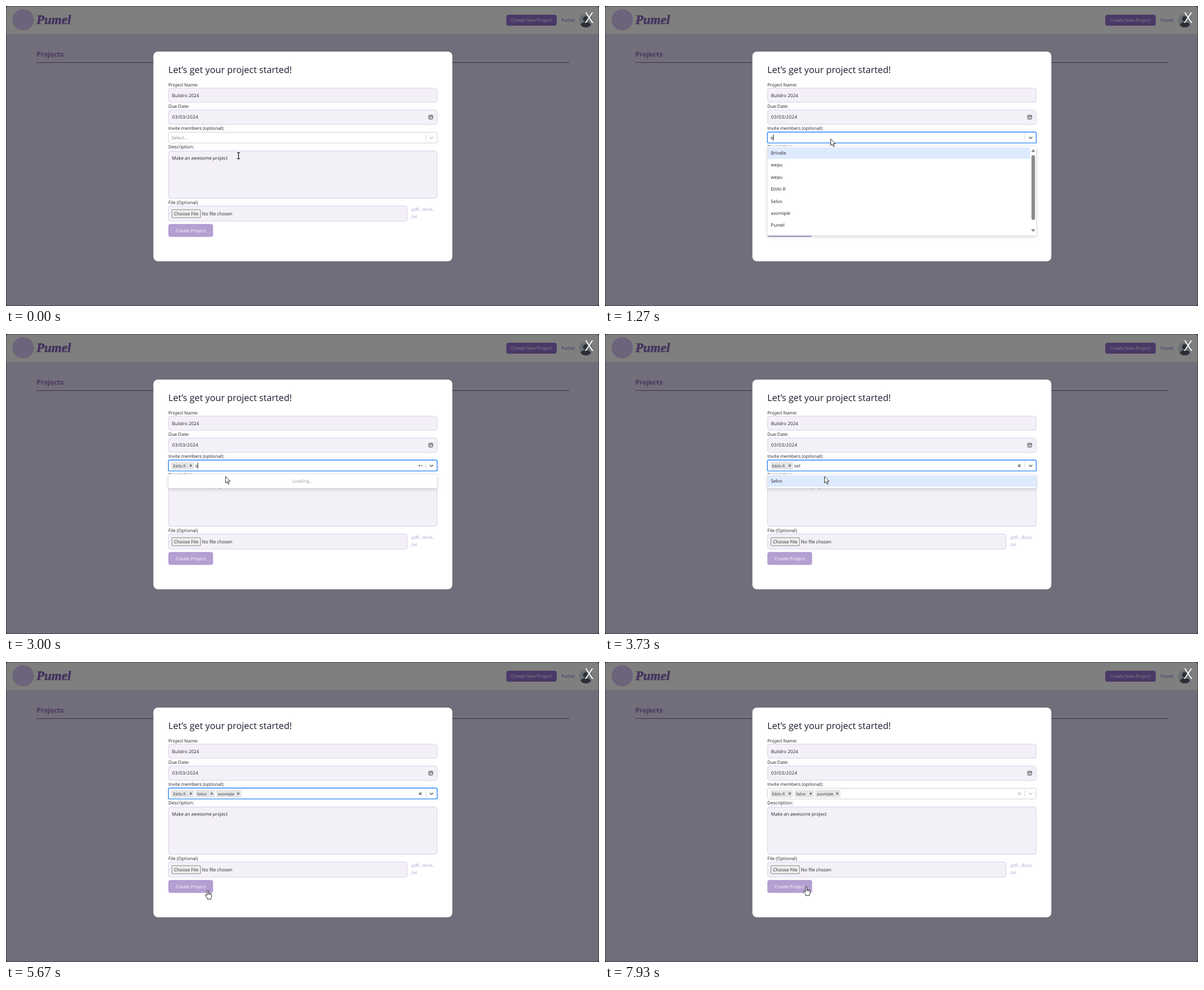
Recreate the animation shown at these times as an HTML page. Size 1052 by 533 pixels, loop 8000 ms.

```html
<!DOCTYPE html>
<html lang="en">
<head>
<meta charset="utf-8">
<title>New project form</title>
<style>
  html, body { margin: 0; width: 100%; height: 100%; overflow: hidden; background: #716d7a; }
  svg { display: block; width: 1052px; height: 533px; }
  text { font: 8.1px "Open Sans", "Noto Sans", sans-serif; fill: #212129; text-rendering: geometricPrecision; white-space: pre; }
  .title { font-size: 16.2px; fill: #1c1b2e; }
  .brand { font: italic bold 23px "Liberation Serif", serif; fill: #46345f; stroke: #46345f; stroke-width: .7; }
  .heading { font-size: 12px; font-weight: bold; fill: #49365f; }
  .close { font-size: 26px; fill: #fff; }
  .dim { fill: #86828b; }
  .nav { fill: #46345f; }
  .hint { fill: #b09acd; }
  .light { fill: #fff; }
  .grey { fill: #858585; }
  .mid { fill: #999; text-anchor: middle; }
  .date { letter-spacing: .35px; }
  .chip { font-size: 6.9px; fill: #333; }
  .field { fill: #f4f0f8; stroke: #d9cfe9; }
  .menu { fill: #fff; stroke: #000; stroke-opacity: .1; stroke-width: .6; filter: drop-shadow(0 2px 3px rgba(0, 0, 0, .16)); }
</style>
</head>
<body>
<svg viewBox="0 0 1052 533">
  <defs><clipPath id="listClip"><rect x="288" y="249" width="478" height="159"/></clipPath></defs>
  <rect width="1052" height="533" fill="#38373b"/>
  <rect x=".8" y=".8" width="1050.4" height="531.4" rx="4" fill="#716d7a"/>
  <path d="M.8 50V4.8a4 4 0 0 1 4-4H1047.2a4 4 0 0 1 4 4V50Z" fill="#7f7f7f"/>
  <circle cx="30.5" cy="24.5" r="19" fill="#6c647a"/>
  <text class="brand" x="54" y="32">Pumel</text>
  <rect x="887.5" y="15.5" width="89.5" height="19.5" rx="4" fill="#4a3866"/>
  <text class="dim" x="896" y="28.4">Create New Project</text>
  <text class="nav" x="985" y="28.4">Pumel</text>
  <circle cx="1028.5" cy="26" r="12" fill="#6a7075"/>
  <circle cx="1028.5" cy="23" r="4.8" fill="#2b3037"/>
  <path d="M1019.5 34Q1021 28.5 1028.5 28.5T1037.5 34A12 12 0 0 1 1019.5 34Z" fill="#2b3037"/>
  <text class="close" x="1027" y="30.3">X</text>
  <text class="heading" x="54" y="90.2">Projects</text>
  <path d="M54 100.5H999" stroke="#37323f"/>

  <rect x="261.5" y="81" width="530.3" height="372.5" rx="8" fill="#fff"/>
  <text class="title" x="288" y="118.8">Let’s get your project started!</text>
  <text x="288" y="142.5">Project Name:</text>
  <rect class="field" x="288.5" y="146" width="476.3" height="25" rx="3.5"/>
  <text x="294.5" y="161.6">Buildro 2024</text>
  <text x="288" y="181">Due Date:</text>
  <rect class="field" x="288.5" y="184.8" width="476.3" height="25.4" rx="3.5"/>
  <text class="date" x="294.7" y="200.4">03/03/2024</text>
  <g fill="none" stroke="#333">
    <rect x="750" y="194" width="7" height="7" rx="1.2" stroke-width=".9"/>
    <path d="M750 196H757" stroke-width="1"/>
    <path d="M751.4 198H756M751.4 199.6H754.5" stroke-width=".8" stroke-dasharray="1 .7"/>
  </g>
  <text x="288" y="220.4">Invite members (optional):</text>
  <text x="288" y="253.4">Description:</text>
  <rect class="field" x="288.5" y="257.6" width="476.3" height="84" rx="3.5"/>
  <text x="294.5" y="272.6">Make an awesome project</text>
  <text x="288" y="351.6">File (Optional)</text>
  <rect class="field" x="288.5" y="355.2" width="423" height="27" rx="3.5"/>
  <rect x="294.3" y="361.9" width="50.8" height="14.2" rx="1.2" fill="#efefef" stroke="#6b6b6b" stroke-width=".8"/>
  <text x="298" y="371.9">Choose File</text>
  <text x="347.8" y="371.9">No file chosen</text>
  <text class="hint" x="717.5" y="364.4">.pdf, .docx,</text>
  <text class="hint" x="717.5" y="377.2">.txt</text>
  <rect x="288" y="387.2" width="79.4" height="23" rx="4" fill="#b49fd2"/>
  <text class="light" x="301" y="401.6">Create Project</text>
  <g id="select"></g>
  <g id="cursor"></g>
</svg>
<script>
const LOOP = 8000, STEP = 200 / 3;
const FOCUS = 400, BLUR = 6070;
const people = ['Brindle', 'wepu', 'wepu', 'Ettilo R', 'Selvo', 'avomiple', 'Pumel', 'Terave'];
const chips = [
  { name: 'Ettilo R', x: 293.6, w: 39.8 },
  { name: 'Selvo', x: 336, w: 34.6 },
  { name: 'avomiple', x: 372.8, w: 44.8 }
];
const inputX = [293.7, 335.8, 373, 420];

// time, typed text, chips chosen, menu content, loading
const states = [
  [0, '', 0, ''],
  [400, '', 0, 'No options'],
  [800, '', 0, ''],
  [1270, 'e', 0, 'all'],
  [1400, 'et', 0, 'match', true],
  [1470, 'ett', 0, 'match', true],
  [1530, 'etti', 0, 'match', true],
  [1730, 'etti', 0, 'match'],
  [2600, '', 1, ''],
  [3000, 's', 1, 'Loading...', true],
  [3070, 'se', 1, 'Loading...', true],
  [3200, 'sel', 1, 'Loading...', true],
  [3400, 'sel', 1, 'match'],
  [3870, '', 2, ''],
  [4670, 'a', 2, 'Loading...', true],
  [4730, 'av', 2, 'Loading...', true],
  [4870, 'av', 2, 'match'],
  [5270, '', 3, '']
];
const loadStarts = [1400, 3000, 4670];
const caretOn = [[1270, 2070], [2600, 3730], [4270, 5270], [5800, 6070]];

// time, x, y of the pointer's hot spot
const path = [
  [0, 412.5, 266], [330, 400.5, 236], [2000, 400.5, 236], [2330, 389.5, 254.3],
  [2470, 389.5, 253], [5270, 389.5, 253], [5600, 357, 409], [5670, 358, 405.3],
  [6870, 358, 405.3], [7130, 357, 409.5], [7400, 357, 399], [7860, 357, 399], [7930, 356.7, 397.8]
];

const shapes = {
  arrow: '<path d="M0 0V11.7l2.6-2.5 2 4.6 1.9-.8-2-4.5h3.6Z" fill="#fff" stroke="#111" stroke-width=".85" stroke-linejoin="round"/>',
  beam: '<path d="M-2.6-5.4H-.8L0-4.9.8-5.4H2.6M0-5V5M-2.6 5.4H-.8L0 4.9.8 5.4H2.6" fill="none" stroke="#111" stroke-width="1.2"/>',
  hand: '<path d="M-1.3 9.5V1.2A1.2 1.2 0 0 1 1.1 1.2V5.5L5.6 6.4Q6.8 6.8 6.8 8.2V11Q6.8 12.5 5.8 14V16H-1V14.4L-4.3 9.6Q-4.8 8.4-3.8 8.1-2.8 8-1.3 9.5Z" fill="#fff" stroke="#111" stroke-width=".9" stroke-linejoin="round"/>' +
    '<path d="M1.1 5.5V8.5M3 6V8.5M4.9 6.3V8.5" stroke="#111" stroke-width=".7"/>',
  busy: '<circle cx="9.6" cy=".3" r="3.7" fill="#e6f2fd" stroke="#2f86e0" stroke-width="2.6"/>'
};

const selectEl = document.getElementById('select');
const cursorEl = document.getElementById('cursor');
const pen = document.createElement('canvas').getContext('2d');
pen.font = '8.1px "Open Sans", "Noto Sans", sans-serif';

const text = (x, y, s, cls = '') => `<text x="${x}" y="${y}" class="${cls}">${s}</text>`;
const rect = (x, y, w, h, attrs) => `<rect x="${x}" y="${y}" width="${w}" height="${h}" ${attrs}/>`;
const line = (d, color, width) => `<path d="${d}" fill="none" stroke="${color}" stroke-width="${width}"/>`;
const cross = (x, y, r, color, width) =>
  line(`M${x - r} ${y - r}L${x + r} ${y + r}M${x + r} ${y - r}L${x - r} ${y + r}`, color, width);

function stateAt(t) {
  const [, typed, count, menu, loading] = states.filter(s => s[0] <= t).pop();
  return { typed, count, menu, loading };
}

function pointAt(t) {
  const i = path.findIndex(p => p[0] > t);
  if (i < 0) return path[path.length - 1].slice(1);
  const [t0, x0, y0] = path[i - 1], [t1, x1, y1] = path[i];
  const u = (t - t0) / (t1 - t0), e = u * u * (3 - 2 * u);
  return [x0 + (x1 - x0) * e, y0 + (y1 - y0) * e];
}

function drawDots(t) {
  const start = loadStarts.filter(s => s <= t).pop();
  return [733, 737.3, 741.6].map((x, i) => {
    const phase = ((t - start) / 1000 + .42 - .16 * i) % 1;
    const glow = Math.max(0, Math.sin(Math.PI * Math.min(1, phase / .8)) ** 2);
    return `<circle cx="${x}" cy="234" r="1.2" fill="#555" opacity="${glow.toFixed(2)}"/>`;
  }).join('');
}

function drawMenu({ menu, count }) {
  if (!menu) return '';
  const all = menu === 'all';
  let out = rect(288, 248.9, 477, all ? 159 : 25, 'rx="2" class="menu"');
  if (!all && menu !== 'match') return out + text(526.3, 264.1, menu, 'mid');
  const names = all ? people : [chips[count].name];
  out += rect(288, 251, all ? 466 : 477, 20.7, 'fill="#deebff"');
  out += '<g clip-path="url(#listClip)">' +
    names.map((name, i) => text(294.3, (264.1 + 21.35 * i).toFixed(2), name)).join('') + '</g>';
  if (all) {
    out += rect(756.6, 265, 6.2, 115, 'rx="3.1" fill="#8b8b8b"') +
      '<path d="M756 259.2L759.7 254.6 763.4 259.2ZM756 396.8L759.7 401.4 763.4 396.8Z" fill="#858585"/>';
  }
  return out;
}

function drawSelect(t, tick) {
  const s = stateAt(t);
  const focused = t >= FOCUS && t < BLUR;
  const tone = focused ? '#5c5c5c' : '#c6c6c6';
  let out = focused
    ? rect(288.2, 224, 476.8, 19.4, 'rx="2" fill="#fff" stroke="#2684ff" stroke-width="1.4"')
    : rect(288.5, 224.3, 476.2, 19, 'rx="2" fill="#fff" stroke="#ccc" stroke-width=".9"');
  out += line('M744.8 228.5V239', '#ccc', .8);
  out += line('M752 232.5L755 235.5 758 232.5', tone, 1.3);
  chips.slice(0, s.count).forEach(c => {
    out += rect(c.x, 227.2, c.w, 13.6, 'rx="1.2" fill="#e5e5e5"') + text(c.x + 3, 236.7, c.name, 'chip') +
      cross(c.x + c.w - 5.6, 234, 1.6, '#222', 1.1);
  });
  const x = inputX[s.count];
  if (s.typed) out += text(x, 236.9, s.typed);
  else if (!s.count) out += text(293.5, 236.9, 'Select...', 'grey');
  if (caretOn.some(([a, b]) => t >= a && t < b)) {
    out += rect((x + pen.measureText(s.typed).width).toFixed(2), 228.4, .9, 10.8, 'fill="#000"');
  }
  if (s.loading) out += drawDots(tick);
  else if (s.count) out += cross(735, 234, 2.2, tone, 1.3);
  return out + drawMenu(s);
}

function drawCursor(t, tick) {
  const [x, y] = pointAt(tick);
  const overText = y > 257 && y < 342 && !stateAt(t).menu;
  const overButton = y > 387 && y < 410.5;
  const shape = overText ? 'beam' : overButton ? 'hand' : 'arrow';
  const busy = t >= 1930 && t < 2470 ? shapes.busy : '';
  return `<g transform="translate(${x.toFixed(2)} ${y.toFixed(2)})">${shapes[shape]}${busy}</g>`;
}

function paint(el, markup) {
  if (el.markup !== markup) el.innerHTML = el.markup = markup;
}

function render(time) {
  const t = time % LOOP;
  const tick = Math.round(Math.floor((t + 1) / STEP) * STEP / 10) * 10;
  paint(selectEl, drawSelect(t, Math.max(t < tick ? t : tick, 0)));
  paint(cursorEl, drawCursor(t, tick));
}

const begin = performance.now();
function frame() {
  render(performance.now() - begin);
  requestAnimationFrame(frame);
}
frame();
</script>
</body>
</html>
```
